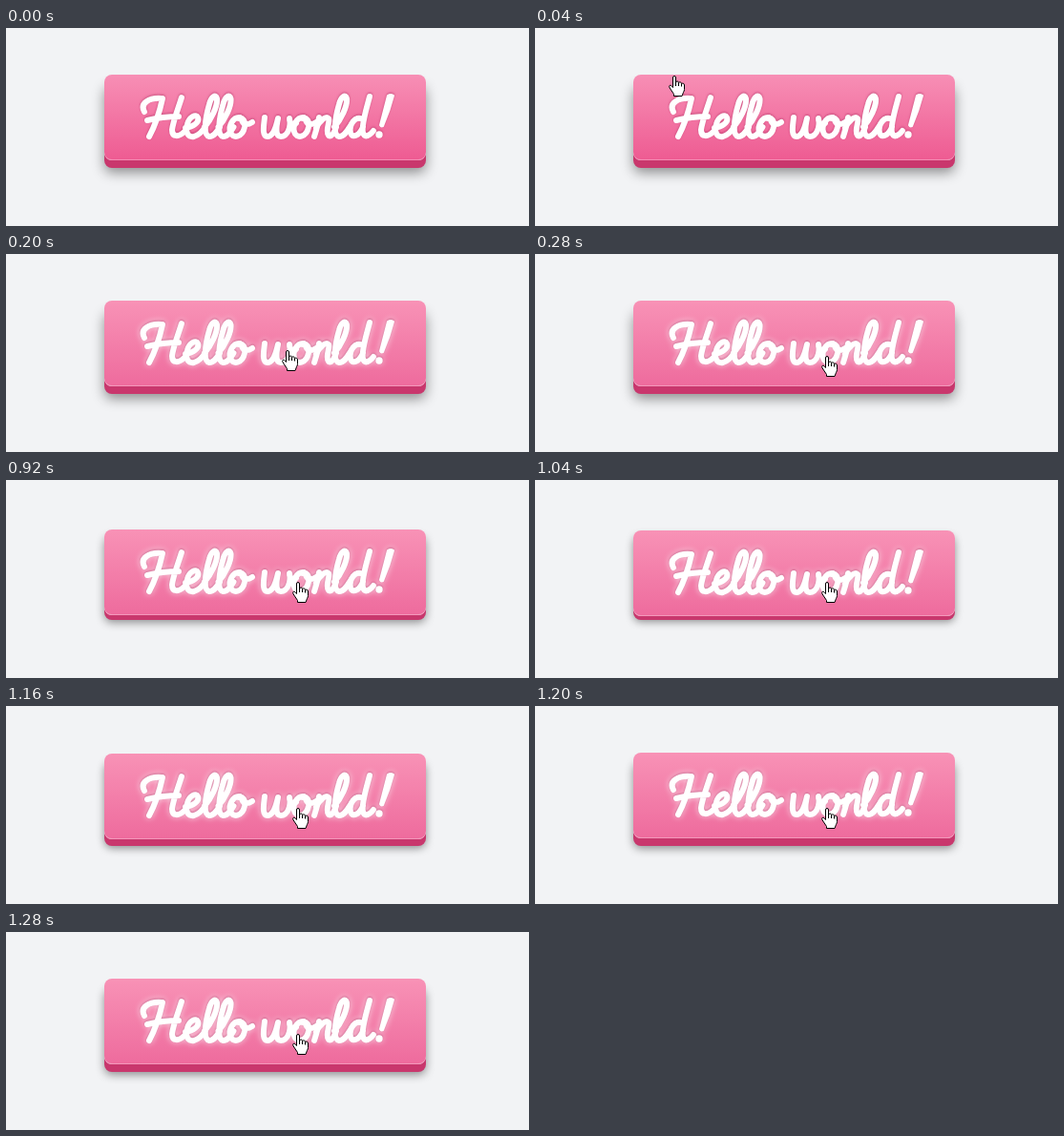
An HTML page that plays this animation: 548 by 208 pixels, repeating every 1440 ms.

```html
<!DOCTYPE html>
<html lang="en">
<head>
<meta charset="utf-8">
<title>Hello world button</title>
<style>
  html, body { margin: 0; width: 100%; height: 100%; overflow: hidden; background: #f2f3f5; }
  #stage { position: relative; width: 548px; height: 208px; overflow: hidden; }
  #button {
    position: absolute; left: 103px; top: 49px; width: 337px; height: 90px; border-radius: 8px;
    background: linear-gradient(#f78fb5, #ee5b92);
  }
  #button.hover { background: linear-gradient(#f892b6, #ee6b9d); }
  svg { position: absolute; left: 0; top: 0; overflow: visible; }
  #lettering {
    left: -103px; top: -49px; fill: none; stroke: #fff; stroke-width: 6;
    stroke-linecap: round; stroke-linejoin: round;
    filter: drop-shadow(0 -1px 1px rgba(170, 45, 95, .55));
  }
  .hover #lettering {
    filter: drop-shadow(0 -1px 1px rgba(170, 45, 95, .5)) drop-shadow(0 0 3px rgba(255, 255, 255, .65));
  }
  #lettering .solid { fill: #fff; stroke-width: 2; }
  #hand { fill: #fff; stroke: #000; stroke-width: 1; stroke-linejoin: round; }
</style>
</head>
<body>
<div id="stage">
  <div id="button">
    <svg id="lettering" width="548" height="208" role="img" aria-label="Hello world!">
      <defs>
        <path id="l" d="M208 104C215 96 222 82 221 74C220 69 215 72 213 80C209 94 206 113 213 114C218 114 221 109 224 104"/>
        <path id="o" d="M245 94C238 93 233 103 235 109C237 117 248 115 250 104C251 97 248 94 244 95M247 95C247 101 252 103 258 99"/>
      </defs>
      <path d="M145 88C140 79 150 73 163 74M164 74C161 88 157 101 150 114M184 73C180 86 175 98 174 107C174 115 181 115 188 108M148 97C160 94 170 93 181 93"/>
      <path d="M188 105C196 104 203 99 201 94C199 90 192 93 190 101C187 111 192 115 197 114C203 112 207 107 209 103"/>
      <use href="#l"/>
      <use href="#l" x="14.5"/>
      <use href="#o"/>
      <path d="M271 94C270 103 268 114 274 114C280 114 283 104 285 95C283 104 282 114 288 114C295 114 299 104 297 95C297 101 301 102 304 100"/>
      <use href="#o" x="67"/>
      <path d="M328 94C327 101 325 108 323 114M325 105C329 97 335 92 338 95C340 98 334 108 338 113C341 115 344 110 346 104"/>
      <use href="#l" x="136"/>
      <path d="M374 96C366 91 359 102 361 110C363 117 371 112 374 104M381 72C378 84 372 102 374 110C376 116 381 113 385 108"/>
      <path class="solid" d="M400 71Q403 69 406 71Q402 87 395 103Q393 104 392 102Z"/>
      <circle class="solid" cx="391" cy="112" r="2.7"/>
    </svg>
  </div>
  <svg id="hand" width="17" height="22">
    <path d="M4.5 12.5V2Q4.5 .5 6 .5T7.5 2V7Q8 6 9.2 6T10.5 7.5Q11 6.8 12.2 6.9T13.5 8.5Q14 8 15.2 8.2T16.5 10V14.5Q16.5 16 15.5 17.5L14 21.5H5.5V19.5L1.2 13Q0 11 1.2 10.3T3.3 11.2Z"/>
    <path d="M7.5 7V11M10.5 7.5V11M13.5 8.5V11.5" fill="none"/>
  </svg>
</div>
<script>
  const LOOP = 1440;
  const rest = { at: 0, hand: null, hover: false, drop: 0, press: 0 };
  const over = { hand: [300, 107], hover: true, drop: 0, press: 0 };
  const steps = [
    rest,
    { ...rest, at: 40, hand: [140, 50] },
    { ...over, at: 200, hand: [289, 101] },
    { ...over, at: 280 },
    { ...over, at: 920, drop: 3, press: .75 },
    { ...over, at: 1040, drop: 4, press: 1 },
    { ...over, at: 1160, drop: 1, press: .85 },
    { ...over, at: 1200, press: .75 },
    { ...over, at: 1280, press: .65 },
  ];
  const button = document.getElementById('button');
  const hand = document.getElementById('hand');
  let shown;

  function show({ hand: spot, hover, drop, press }) {
    button.classList.toggle('hover', hover);
    button.style.transform = `translateY(${drop}px)`;
    // The rim keeps its lower edge while the face sinks.
    button.style.boxShadow = `inset 0 -1px 0 rgba(255,255,255,.3), 0 ${8 - drop}px 0 #c9376d,
      0 ${13 - 3 * press - drop}px ${13 - 5 * press}px rgba(0,0,0,.42)`;
    hand.style.visibility = spot ? 'visible' : 'hidden';
    if (spot) hand.style.transform = `translate(${spot[0]}px, ${spot[1]}px)`;
  }

  function tick() {
    const time = performance.now() % LOOP;
    const step = steps.findLast(s => s.at <= time);
    if (step !== shown) show(shown = step);
    requestAnimationFrame(tick);
  }
  tick();
</script>
</body>
</html>
```
